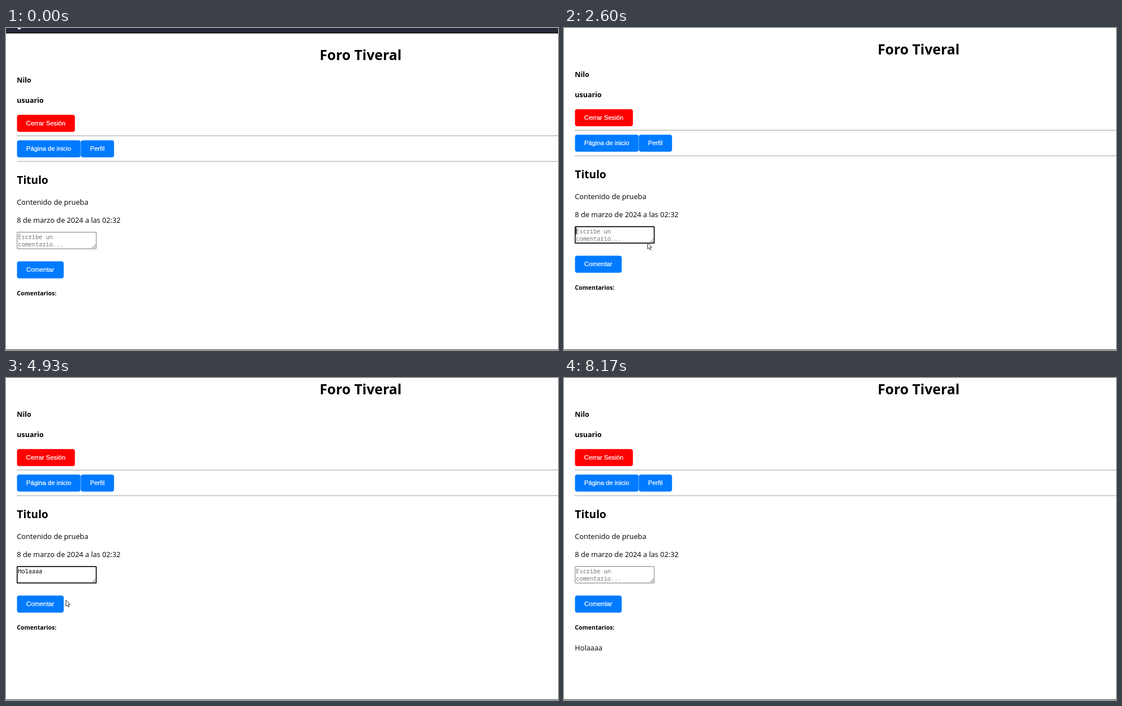
An HTML page for the animation above (9.37 s loop, 980 px wide and 572 px high).

```html
<!DOCTYPE html>
<html lang="es">
<head>
<meta charset="utf-8">
<title>Foro</title>
<style>
html, body { margin: 0; width: 100%; height: 100%; overflow: hidden; background: #fff; }
svg { display: block; width: 980px; height: 572px; }
text { font: 12.8px "Open Sans", sans-serif; }
.bold { font-weight: 700; font-size: 12.5px; }
.h1 { font-size: 24.8px; text-anchor: middle; }
.h2 { font-size: 19.2px; }
.h5 { font-size: 10.5px; }
.button text { font: 11.3px "Liberation Sans", Arial, sans-serif; fill: #fff; stroke: #fff; stroke-width: .25; text-anchor: middle; }
.mono { font: 10.3px "Noto Sans Mono", monospace; }
#hint { fill: #757575; }
#field { fill: #fff; stroke: #767676; }
#field.focused { stroke: #101010; stroke-width: 1.7; }
#cursor path { fill: #fff; stroke: #222; stroke-width: .9; }
</style>
</head>
<body>
<svg viewBox="0 0 980 572">
  <g id="page">
    <rect width="980" height="9" fill="#262937"/>
    <rect y="8" width="980" height="1.6" fill="#08080c"/>
    <circle cx="23.5" cy="-.5" r="3" fill="#fff"/>
    <text class="bold h1" x="629.5" y="57">Foro Tiveral</text>
    <text class="bold" x="19.3" y="97">Nilo</text>
    <text class="bold" x="19.3" y="133">usuario</text>
    <path d="M19 191.5H980M19 237H980" stroke="#a0a0a0"/>
    <text class="bold h2" x="19.3" y="276.5">Titulo</text>
    <text x="19.3" y="314">Contenido de prueba</text>
    <text x="19.3" y="345.5">8 de marzo de 2024 a las 02:32</text>
    <rect id="field" x="19.8" y="362.8" width="140.4" height="29.4" rx="1"/>
    <path d="M153 391l6-6M156.5 391l2.5-2.5" stroke="#555"/>
    <g id="hint">
      <text class="mono" x="21.3" y="375">Escribe un</text>
      <text class="mono" x="21.3" y="388">comentario...</text>
    </g>
    <text class="mono" id="typed" x="21.3" y="375"></text>
    <rect id="caret" y="364" width="1" height="13"/>
    <text class="bold h5" x="19.3" y="475">Comentarios:</text>
    <text id="comment" x="19.3" y="511.5">Holaaaa</text>
  </g>
  <rect y="571" width="980" height="1" fill="#444"/>
  <g id="cursor">
    <path id="arrow" d="M.5.5V11.6L3 9.3L4.8 13.2L6.5 12.4L4.8 8.6H8Z"/>
    <path id="resize" d="M-6-6H-1.5L-3-4.2L4.2 3L6 1.5V6H1.5L3 4.2L-4.2-3L-6-1.5Z"/>
    <path id="beam" d="M-2.5-7H2.5M0-7V7M-2.5 7H2.5"/>
    <path id="hand" d="M-1 7V1Q0-.8 1 1V5L6 6.5Q7 8 5.5 13H.5L-3.5 8Z"/>
  </g>
</svg>
<script>
const LOOP = 9370, WORD = 'Holaaaa';
const FOCUS = 1480, CLICK = 5410, POSTED = 5540, CLEARED = 5880;
const TYPING = 3070, KEY_GAP = 163, BLINK = 530;
const ENTER = 130, LEAVE = 8170;

// Each stroke of the pointer eases out to its end; "bend" pulls it into an arc.
const start = [846, 541];
const strokes = [
  { from: ENTER, until: 440, to: [407, 373] },
  { from: 680, until: 1200, to: [148, 381] },
  { from: 4570, until: 5230, to: [95, 397] },
  { from: 6320, until: 6600, to: [66, 478] },
  { from: 7330, until: 7820, to: [498, 337], bend: [300, -184] },
  { from: 8050, until: LEAVE, to: [845, 566] }
];

const $ = id => document.getElementById(id);
const set = (el, attrs) => { for (const k in attrs) el.setAttribute(k, attrs[k]); };
const show = (el, on) => set(el, { visibility: on ? 'visible' : 'hidden' });
const clamp = (v, lo, hi) => Math.min(hi, Math.max(lo, v));
const ramp = (t, a, b) => clamp((t - a) / (b - a), 0, 1);
const inside = (x, y, b) => x >= b.x && x <= b.x + b.w && y >= b.y && y <= b.y + b.h;

function add(parent, tag, attrs) {
  const el = document.createElementNS('http://www.w3.org/2000/svg', tag);
  set(el, attrs);
  return parent.appendChild(el);
}

function button(label, x, y, w, color = '#007bff', hover = '#0056b3') {
  const g = add($('page'), 'g', { class: 'button' }), h = 30.2;
  const rect = add(g, 'rect', { x, y, width: w, height: h, rx: 4 });
  add(g, 'text', { x: x + w / 2 - .2, y: y + 18.3 }).textContent = label;
  return { x, y, w, h, rect, color, hover };
}

const buttons = [
  button('Cerrar Sesión', 19.5, 154.2, 102.8, '#f00', '#f00'),
  button('Página de inicio', 19.5, 199.5, 113),
  button('Perfil', 132.8, 199.5, 59),
  button('Comentar', 19.5, 414.5, 83)
];
const field = { x: 19, y: 362, w: 142, h: 31 };

function pointer(t) {
  let pos = start;
  for (const { from, until, to, bend } of strokes) {
    const f = ramp(t, from, until), u = 1 - (1 - f) ** 2;
    pos = pos.map((p, i) => {
      const mid = bend ? bend[i] : (p + to[i]) / 2;
      return (1 - u) ** 2 * p + 2 * u * (1 - u) * mid + u * u * to[i];
    });
  }
  return pos;
}

function render(t) {
  const scroll = Math.round(10 * ramp(t, 2520, 2600) + 18 * ramp(t, 2700, 2800));
  set($('page'), { transform: `translate(0 ${-scroll})` });

  const [x, y] = pointer(t);
  const visible = t >= ENTER && t < LEAVE;
  let kind = 'arrow';
  if (inside(x, y + scroll, field) && t < 2560) kind = t < 1690 ? 'beam' : 'resize';
  for (const b of buttons) {
    const over = visible && inside(x, y + scroll, b);
    if (over) kind = 'hand';
    set(b.rect, { fill: over ? b.hover : b.color });
  }
  set($('cursor'), { transform: `translate(${x} ${y})` });
  for (const shape of $('cursor').children) show(shape, visible && shape.id === kind);

  const focused = t >= FOCUS && t < CLICK;
  $('field').classList.toggle('focused', focused);

  const keys = Math.floor((t - TYPING) / KEY_GAP) + 1;
  const typed = t < CLEARED ? clamp(keys, 0, WORD.length) : 0;
  $('typed').textContent = WORD.slice(0, typed);
  show($('hint'), !typed);

  const blinkStart = typed ? TYPING + (typed - 1) * KEY_GAP : FOCUS;
  set($('caret'), { x: 21 + typed * 6.18 });
  show($('caret'), focused && Math.floor((t - blinkStart) / BLINK) % 2 === 0);
  show($('comment'), t >= POSTED);
}

function frame() {
  render(performance.now() % LOOP);
  requestAnimationFrame(frame);
}
frame();
</script>
</body>
</html>
```
